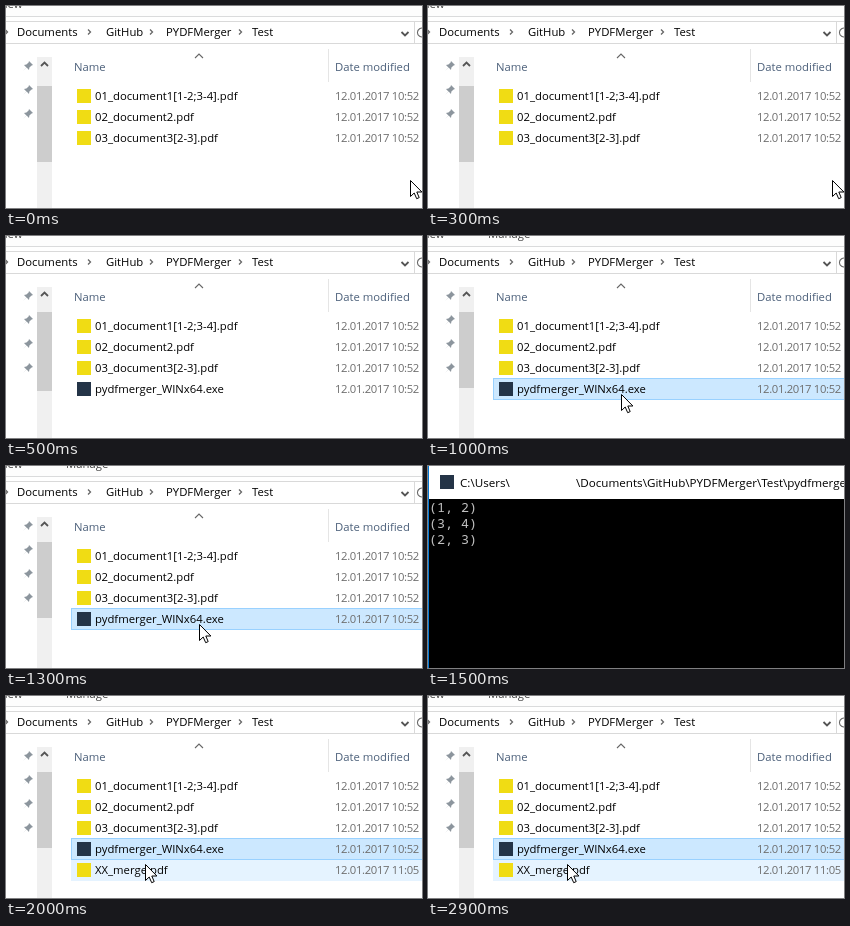
These frames come from a looping animation (416 by 202 pixels, 3.5 s). An HTML page:

```html
<!DOCTYPE html>
<html lang="en">
<head>
<meta charset="utf-8">
<title>Merging PDF files</title>
<style>
  html, body { margin: 0; width: 100%; height: 100%; overflow: hidden; background: #fff; }
  svg { display: block; width: 416px; height: 202px; }
  text { font: 11.3px "Open Sans", "Noto Sans", sans-serif; white-space: pre; }
  .head { fill: #4c607a; }
  .date { fill: #6d6d6d; letter-spacing: -.35px; }
  .ribbon { fill: #444; }
  .title { font-size: 11.65px; }
  .shell { font: 13.33px "Noto Sans Mono", "DejaVu Sans Mono", monospace; fill: #c0c0c0; }
  .line { fill: none; stroke: #666; stroke-width: 1.1; }
  .bold { stroke: #555; stroke-width: 1.8; }
</style>
</head>
<body>
<svg viewBox="0 0 416 202">
  <defs>
    <path id="pin" d="M1-5 5-1 3.6-.6 1.4 1.6 1 4-1.4 1.6-5 5-1.6 1.4-4-1-1.6-1.4.6-3.6Z" fill="#8c959d"/>
    <path id="next" class="line" d="M-1-2.5 1.5 0-1 2.5" style="stroke-width: 1.3"/>
  </defs>

  <g id="explorer">
    <rect width="416" height="10" fill="#fdfdfd"/>
    <rect y="10" width="416" height="1" fill="#dadbdc"/>
    <text class="ribbon" x="-8" y="2">View</text>
    <text class="ribbon" id="manage" x="60" y="2">Manage</text>

    <path d="M0 15.5H416M0 37.5H416M408.5 15V38" stroke="#d9d9d9" fill="none"/>
    <g id="crumbs"></g>
    <path class="line bold" d="M395.5 26 399 29.5 402.5 26"/>
    <path class="line" d="M418 22.5A4.500 4.500 0 1 0 418 30.5"/>

    <g id="pins"></g>
    <rect x="31" y="51" width="15" height="151" fill="#f0f0f0"/>
    <rect id="thumb" x="31" width="15" fill="#cdcdcd"/>
    <path class="line bold" d="M35 60 38.500 56.500 42 60"/>

    <path class="line" d="M189 52 193 48 197 52"/>
    <path d="M322.500 43V76" stroke="#e5e5e5"/>
    <text class="head" x="68" y="65">Name</text>
    <text class="head" x="329" y="65">Date modified</text>

    <rect id="hover" x="65" y="164" width="351" height="21" fill="#e5f3ff"/>
    <rect id="selected" x="65.500" y="142.500" width="360" height="21" fill="#cce8ff" stroke="#99d1ff"/>
    <g id="files"></g>
    <path id="cursor" d="M.5.5V16.500L4.200 13 6.700 18.700 9.200 17.600 6.800 12H11.900Z" fill="#fff" stroke="#000"/>
  </g>

  <g id="console">
    <rect width="416" height="202" fill="#fff"/>
    <rect y="33" width="416" height="169"/>
    <rect width="1" height="202" fill="#0078d7"/>
    <rect x="12" y="9" width="14" height="14" fill="#243447"/>
    <text class="title" x="32" y="21">C:\Users\</text>
    <text class="title" x="148" y="21">\Documents\GitHub\PYDFMerger\Test\pydfmerger_WINx64.exe</text>
    <text class="shell" x="1" y="46">(1, 2)</text>
    <text class="shell" x="1" y="62">(3, 4)</text>
    <text class="shell" x="1" y="78">(2, 3)</text>
  </g>
</svg>
<script>
const $ = id => document.getElementById(id);
const show = (node, on) => { node.style.display = on ? '' : 'none'; };

const crumbs = [['Documents', 11], ['GitHub', 100], ['PYDFMerger', 160], ['Test', 246]];
$('crumbs').innerHTML = crumbs.map(([name, x], i) =>
  `<use href="#next" x="${[0, 83, 145, 234][i]}" y="26"/><text x="${x}" y="30">${name}</text>`).join('');

$('pins').innerHTML = [60, 84, 108, 132].map(y => `<use href="#pin" x="22" y="${y}"/>`).join('');

const files = ['01_document1[1-2;3-4].pdf', '02_document2.pdf', '03_document3[2-3].pdf',
  'pydfmerger_WINx64.exe', 'XX_merge.pdf'];
$('files').innerHTML = files.map((name, i) => {
  const y = 90 + 21 * i;
  const color = name.endsWith('.exe') ? '#243447' : '#f0dc14';
  return `<g><rect x="71" y="${y - 7}" width="14" height="14" fill="${color}"/>
    <text x="89" y="${y + 4}">${name}</text>
    <text class="date" x="329" y="${y + 4}">12.01.2017 ${i === 4 ? '11:05' : '10:52'}</text></g>`;
}).join('');

// thumb: top and height of the scrollbar handle
const scenes = [
  { until: 500, files: 3, pins: 3, thumb: [80, 76], cursor: [404, 174] },
  { until: 1000, files: 4, pins: 4, thumb: [76, 79] },
  { until: 1500, files: 4, pins: 4, thumb: [76, 76], manage: true, selected: true, cursor: [193, 158] },
  { until: 2000, console: true },
  { until: 3500, files: 5, pins: 4, thumb: [76, 76], manage: true, selected: true, hover: true, cursor: [139, 168] }
];

function draw(scene) {
  show($('console'), scene.console);
  show($('explorer'), !scene.console);
  if (scene.console) return;
  for (const id of ['manage', 'selected', 'hover', 'cursor']) show($(id), scene[id]);
  for (const id of ['files', 'pins'])
    [...$(id).children].forEach((node, i) => show(node, i < scene[id]));
  const [top, height] = scene.thumb;
  $('thumb').setAttribute('y', top);
  $('thumb').setAttribute('height', height);
  if (scene.cursor) $('cursor').setAttribute('transform', `translate(${scene.cursor})`);
}

const start = performance.now();
function tick() {
  const t = (performance.now() - start) % 3500;
  draw(scenes.find(scene => t < scene.until));
  requestAnimationFrame(tick);
}
tick();
</script>
</body>
</html>
```
